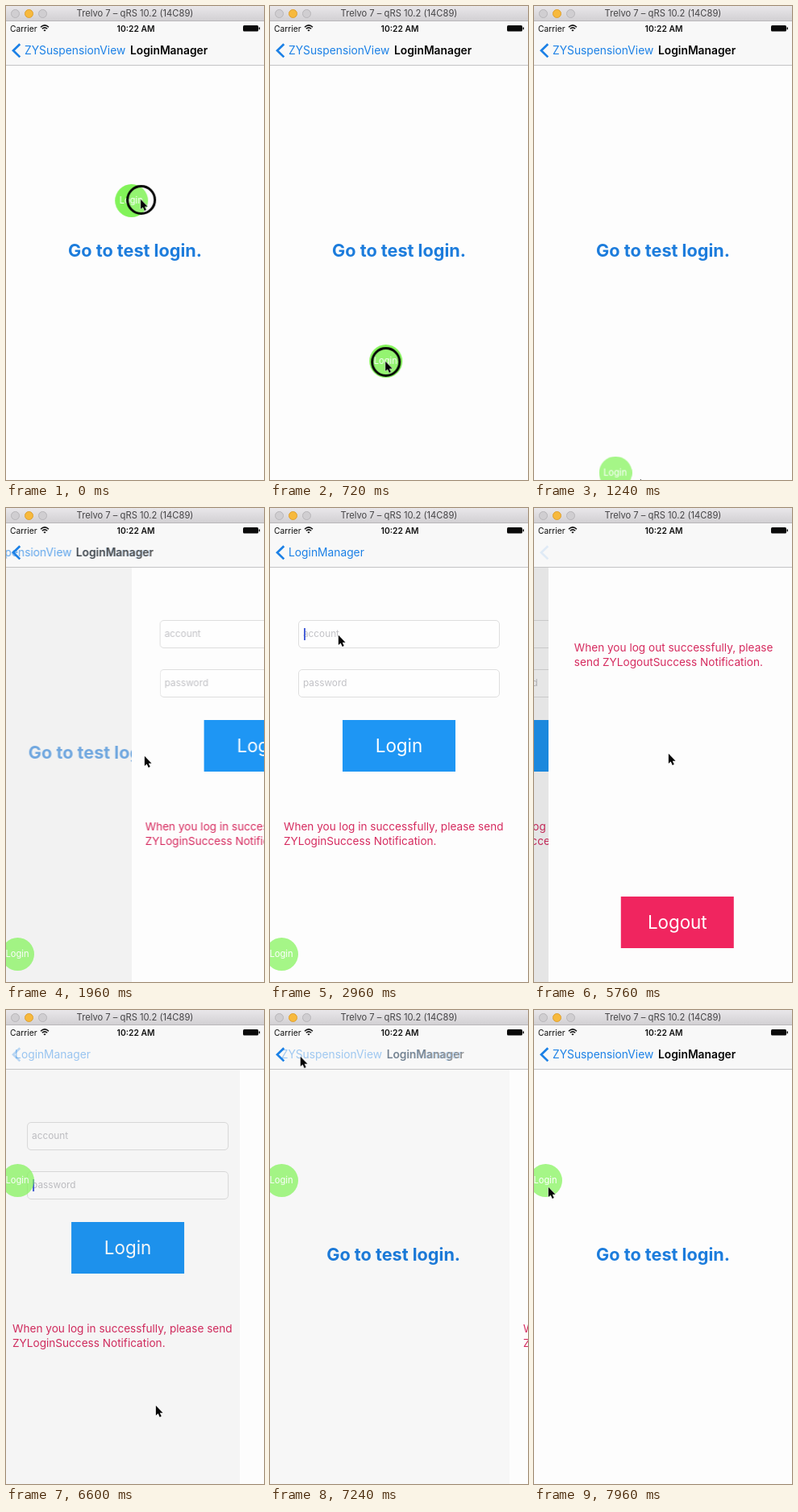
Animation, 320 px wide and 588 px high, one loop 8 s. Source, as an HTML page:

```html
<!DOCTYPE html>
<html lang="en">
<head>
<meta charset="utf-8">
<title>Login manager demo</title>
<style>
html, body { margin: 0; width: 100%; height: 100%; overflow: hidden; background: #fdfdfd; }
body { font-family: Inter, Roboto, sans-serif; -webkit-font-smoothing: antialiased; }
#stage { position: relative; width: 320px; height: 588px; overflow: hidden; }
#stage div, #stage p, #stage svg { position: absolute; margin: 0; box-sizing: border-box; }
p { line-height: 20px; white-space: nowrap; }

/* every loop is 8 s, so 1% = 80 ms */
#stage .anim {
  animation-duration: 8s;
  animation-iteration-count: infinite;
  animation-timing-function: cubic-bezier(.36, .66, .04, 1), linear;
}
#stage .lin { animation-timing-function: linear; }
#stage .cut { animation-timing-function: step-end; }
#stage .dim { animation-timing-function: cubic-bezier(.3, .5, .4, 1); }

/* window and status bar */
#window { width: 320px; height: 19px; background: linear-gradient(#e9e7ea, #d2d0d3); border-bottom: 1px solid #b9b7ba; }
.dot { top: 4px; width: 11px; height: 11px; border-radius: 50%; background: #d0ced1; border: 1px solid #b8b6b9; }
.dot.on { background: #f7b93d; border-color: #dea02f; }
#window p { left: 0; width: 320px; top: -1px; text-align: center; font-size: 11.2px; color: #454446; }
#bar { top: 19px; width: 320px; height: 55px; background: #f8f8f8; border-bottom: 1px solid #c4c4c5; overflow: hidden; }
#bar .small { top: -1px; font-size: 10.3px; color: #111; }
#bar .nav { top: 26px; font-size: 13.8px; color: #1b80e6; }
#bar .title { left: 154px; font-weight: 600; color: #050505; }
.back { left: 23px; }

/* pages */
.page { top: 0; left: 0; width: 320px; height: 588px; background: #fdfdfd; }
.dim { width: 320px; height: 588px; background: #000; opacity: 0; }
.btn { width: 140px; height: 64px; color: #fff; font-size: 22.4px; text-align: center; }
.btn p { width: 140px; top: 22px; }
.note { font-size: 13.6px; line-height: 17.5px; color: #d62b5f; }
.field { left: 35px; width: 250px; height: 35px; border: 1px solid #dedede; border-radius: 5px; background: #fefefe; font-size: 11.8px; color: #111; }
.field p { left: 5px; top: 6px; }
.field .hint { color: #c2c2c6; }
.caret { left: 6px; top: 9px; width: 1.5px; height: 15px; background: #4a62d8; }
#go { left: 0; width: 320px; top: 293px; text-align: center; font-size: 21.65px; font-weight: 700; color: #1c7cdc; }

#test { animation-name: testX; }
#login { animation-name: loginX; transform: translateX(320px); }
#logout { animation-name: logoutX; transform: translateX(320px); }
#test .dim { animation-name: testDim; }
#login .dim { animation-name: loginDim; }
@keyframes testX { 0%, 23% { transform: none; } 30.75%, 86.875% { transform: translateX(-96px); } 94.625%, 100% { transform: none; } }
@keyframes testDim { 0%, 23% { opacity: 0; } 30.75%, 86.875% { opacity: .115; } 94.625%, 100% { opacity: 0; } }
@keyframes loginX {
  0%, 23% { transform: translateX(320px); }
  30.75%, 68.05% { transform: translateX(0); }
  75.8%, 79.3% { transform: translateX(-96px); }
  86.85%, 86.875% { transform: translateX(0); }
  94.625%, 100% { transform: translateX(320px); }
}
@keyframes loginDim { 0%, 68.05% { opacity: 0; } 75.8%, 79.3% { opacity: .115; } 86.85%, 100% { opacity: 0; } }
@keyframes logoutX { 0%, 68.05% { transform: translateX(320px); } 75.8%, 79.3% { transform: none; } 86.85%, 100% { transform: translateX(320px); } }

/* navigation titles */
#chevron { left: 7px; top: 27px; animation-name: chevron; }
#backRoot { animation-name: rootX, rootFade; }
#title { animation-name: titleX, rootFade; }
#backLogin { animation-name: backX, backFade; }
@keyframes chevron { 0%, 68.05% { opacity: 1; } 72.5%, 80.8% { opacity: 0; } 86.85%, 100% { opacity: 1; } }
@keyframes rootX { 0%, 23% { transform: none; } 30.75%, 86.875% { transform: translateX(-130px); } 94.625%, 100% { transform: none; } }
@keyframes titleX { 0%, 23% { transform: none; } 30.75%, 86.875% { transform: translateX(-131px); } 94.625%, 100% { transform: none; } }
@keyframes rootFade { 0%, 23% { opacity: 1; } 28%, 88.5% { opacity: 0; } 93.5%, 100% { opacity: 1; } }
@keyframes backX {
  0%, 23% { transform: translateX(131px); }
  30.75%, 68.05% { transform: translateX(0); }
  75.8%, 79.3% { transform: translateX(-128px); }
  86.85%, 86.875% { transform: translateX(0); }
  94.625%, 100% { transform: translateX(131px); }
}
@keyframes backFade {
  0%, 23% { opacity: 0; }
  30%, 68.05% { opacity: 1; }
  71.5%, 79.3% { opacity: 0; }
  86.85%, 86.875% { opacity: 1; }
  92%, 100% { opacity: 0; }
}

/* pressed labels */
#go { animation-name: goTap; }
#login .btn { left: 90px; top: 263px; background: #1e96f4; }
#login .btn p { animation-name: loginTap; }
#logout .btn { left: 90px; top: 482px; background: #f0255f; }
#logout .btn p { animation-name: logoutTap; }
@keyframes goTap { 0%, 21.9% { opacity: 1; } 22%, 23% { opacity: .2; } 26%, 100% { opacity: 1; } }
@keyframes loginTap { 0%, 60.4% { opacity: 1; } 60.5%, 61.6% { opacity: .2; } 65.5%, 100% { opacity: 1; } }
@keyframes logoutTap { 0%, 78% { opacity: 1; } 78.1%, 79.2% { opacity: .2; } 82%, 100% { opacity: 1; } }

/* typing */
#account .hint { animation-name: accHint; }
#account .typed { animation-name: accType; }
#account .caret { animation-name: accCaret, accBlink; }
#password .hint { animation-name: pwHint; }
#password .typed { animation-name: pwType; }
#password .caret { animation-name: pwCaret, pwBlink; }
@keyframes accHint { 0% { opacity: 1; } 37.5% { opacity: 0; } 68% { opacity: 1; } }
@keyframes accType {
  0% { clip-path: inset(0 100% 0 0); }
  37.5% { clip-path: inset(0 83.3% 0 0); }
  39% { clip-path: inset(0 66.7% 0 0); }
  41% { clip-path: inset(0 50% 0 0); }
  42.5% { clip-path: inset(0 33.3% 0 0); }
  44.5% { clip-path: inset(0 16.7% 0 0); }
  46% { clip-path: inset(0); }
  68% { clip-path: inset(0 100% 0 0); }
}
@keyframes accCaret {
  0% { transform: none; }
  37.5% { transform: translateX(6.6px); }
  39% { transform: translateX(13.2px); }
  41% { transform: translateX(19.8px); }
  42.5% { transform: translateX(26.4px); }
  44.5% { transform: translateX(33px); }
  46% { transform: translateX(39.5px); }
}
@keyframes accBlink { 0% { opacity: 0; } 31.5% { opacity: 1; } 50% { opacity: 0; } }
@keyframes pwHint { 0% { opacity: 1; } 53% { opacity: 0; } 68% { opacity: 1; } }
@keyframes pwType {
  0% { clip-path: inset(0 100% 0 0); }
  53% { clip-path: inset(0 80% 0 0); }
  54.5% { clip-path: inset(0 53% 0 0); }
  56% { clip-path: inset(0 27% 0 0); }
  57.5% { clip-path: inset(0); }
  68% { clip-path: inset(0 100% 0 0); }
}
@keyframes pwCaret {
  0% { transform: none; }
  53% { transform: translateX(5.5px); }
  54.5% { transform: translateX(13px); }
  56% { transform: translateX(20px); }
  57.5% { transform: translateX(27.5px); }
  68% { transform: none; }
}
@keyframes pwBlink { 0% { opacity: 0; } 50.5% { opacity: 1; } 61% { opacity: 0; } 80% { opacity: 1; } 88% { opacity: 0; } }

/* floating ball */
#ball { left: -20.5px; top: -20.5px; width: 41px; height: 41px; border-radius: 50%; background: #82f359; color: #fff; animation-name: ballMove, ballShow; }
#ball p { width: 41px; top: 10.5px; text-align: center; font-size: 11.2px; }
@keyframes ballMove {
  0% { transform: translate(155px, 241px); }
  1% { transform: translate(171px, 240px); }
  3% { transform: translate(268px, 255px); }
  4.2% { transform: translate(297px, 295px); }
  5.5% { transform: translate(285px, 365px); }
  7.5% { transform: translate(205px, 425px); }
  9% { transform: translate(143px, 440px); }
  10.5% { transform: translate(170px, 443px); }
  12.5% { transform: translate(158px, 520px); }
  15% { transform: translate(132px, 588px); animation-timing-function: ease-out; }
  18%, 72% { transform: translate(14px, 553px); animation-timing-function: step-end; }
  73%, 100% { transform: translate(14px, 211px); }
}
@keyframes ballShow {
  0%, 14.9% { opacity: 1; }
  15%, 67.4% { opacity: .72; }
  67.5%, 78.9% { opacity: 0; }
  79%, 100% { opacity: .72; }
}

/* pointer */
#pointer { left: 0; top: 0; width: 0; height: 0; animation-name: pointer; }
#ring { left: -18px; top: -17.5px; width: 37px; height: 37px; border: 3px solid #050505; border-radius: 50%; background: rgba(255, 255, 255, .15); animation-name: ring; }
#arrow { left: -2px; top: -1px; }
@keyframes pointer {
  0% { transform: translate(167px, 239px); }
  1% { transform: translate(179px, 240px); }
  3% { transform: translate(272px, 255px); }
  4.2% { transform: translate(299px, 295px); }
  5.5% { transform: translate(285px, 365px); }
  7.5% { transform: translate(205px, 425px); }
  9% { transform: translate(143px, 440px); }
  10.5% { transform: translate(170px, 443px); }
  12.5% { transform: translate(158px, 520px); }
  15%, 16% { transform: translate(132px, 586px); animation-timing-function: ease-in-out; }
  20.5%, 26.5% { transform: translate(172px, 307px); animation-timing-function: ease-in-out; }
  30.5%, 47.5% { transform: translate(85px, 157px); animation-timing-function: ease-in-out; }
  49.8%, 58% { transform: translate(80px, 230px); animation-timing-function: ease-in-out; }
  60.2%, 63% { transform: translate(172px, 306px); }
  67%, 72.5% { transform: translate(167px, 304px); animation-timing-function: ease-in-out; }
  77.2%, 83% { transform: translate(186px, 490px); animation-timing-function: ease-in-out; }
  85.8%, 90% { transform: translate(38px, 56px); animation-timing-function: ease-in-out; }
  99%, 100% { transform: translate(18px, 219px); }
}
@keyframes ring {
  0% { opacity: 1; } 14.9% { opacity: 0; }
  22% { opacity: 1; } 23% { opacity: 0; }
  31% { opacity: 1; } 32% { opacity: 0; }
  50% { opacity: 1; } 51% { opacity: 0; }
  60.4% { opacity: 1; } 61.2% { opacity: 0; }
  78% { opacity: 1; } 79% { opacity: 0; }
  85.9% { opacity: 1; } 86.8% { opacity: 0; }
}
</style>
</head>
<body>
<div id="stage">
  <div id="test" class="page anim">
    <p id="go" class="anim lin">Go to test login.</p>
    <div class="dim anim"></div>
  </div>

  <div id="login" class="page anim">
    <div id="account" class="field" style="top:139px">
      <p class="hint anim cut">account</p>
      <p class="typed anim cut">aaaaaa</p>
      <div class="caret anim cut"></div>
    </div>
    <div id="password" class="field" style="top:200px">
      <p class="hint anim cut">password</p>
      <p class="typed anim cut">1234</p>
      <div class="caret anim cut"></div>
    </div>
    <div class="btn"><p class="anim lin">Login</p></div>
    <p class="note" style="left:17px;top:387px">When you log in successfully, please send<br>ZYLoginSuccess Notification.</p>
    <div class="dim anim"></div>
  </div>

  <div id="logout" class="page anim">
    <p class="note" style="left:32px;top:165px">When you log out successfully, please<br>send ZYLogoutSuccess Notification.</p>
    <div class="btn"><p class="anim lin">Logout</p></div>
  </div>

  <div id="bar">
    <p class="small" style="left:5px">Carrier</p>
    <svg style="left:42px;top:3px" width="12" height="11" fill="none" stroke="#111" stroke-width="1.5">
      <path d="M1 4.2Q6 -.4 11 4.2M2.8 6.3Q6 3.4 9.2 6.3"/>
      <path d="M6 9.6L4.4 8Q6 6.6 7.6 8Z" fill="#111" stroke="none"/>
    </svg>
    <p class="small" style="left:0;width:322px;text-align:center;font-weight:600">10:22 AM</p>
    <svg style="left:294px;top:5px" width="22" height="8">
      <rect width="19" height="7.5" rx="1.5" fill="#0a0a0a"/>
      <rect x="19.6" y="2.3" width="1.4" height="3" rx=".6" fill="#0a0a0a"/>
    </svg>
    <svg id="chevron" class="anim lin" width="12" height="19" fill="none" stroke="#1b80e6" stroke-width="2.7">
      <path d="M10.3 1.2L2 9.3L10.3 17.4"/>
    </svg>
    <p id="backRoot" class="nav back anim">ZYSuspensionView</p>
    <p id="backLogin" class="nav back anim">LoginManager</p>
    <p id="title" class="nav title anim">LoginManager</p>
  </div>

  <div id="window">
    <div class="dot" style="left:6px"></div>
    <div class="dot on" style="left:23px"></div>
    <div class="dot" style="left:40px"></div>
    <p>Trelvo 7 – qRS 10.2 (14C89)</p>
  </div>

  <div id="ball" class="anim lin"><p>Login</p></div>

  <div id="pointer" class="anim lin">
    <div id="ring" class="anim cut"></div>
    <svg id="arrow" width="14" height="18" viewBox="0 0 15 19.3">
      <path d="M2 2V15L5 12.3L7.2 17.2L9.4 16.2L7.3 11.4H11.3Z" fill="#050505" stroke="#fff" stroke-width="1" paint-order="stroke"/>
    </svg>
  </div>
</div>
</body>
</html>
```
